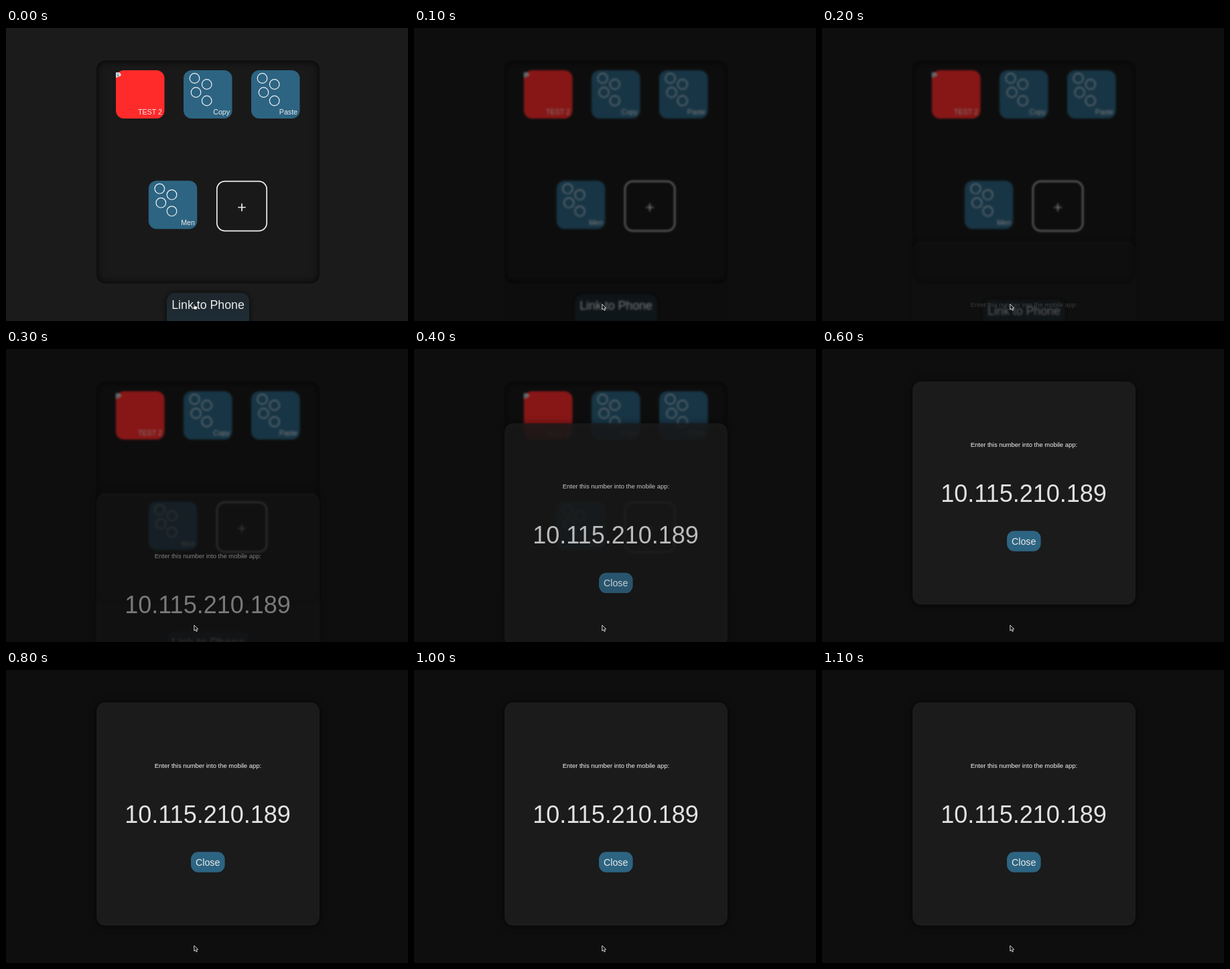
An HTML page with a canvas that plays this animation: 600 px wide and 437 px high, repeating every 1400 ms.

```html
<!DOCTYPE html>
<html lang="en">
<head>
<meta charset="utf-8">
<title>Link to Phone</title>
<style>
html, body { margin: 0; width: 100%; height: 100%; overflow: hidden; background: #1b1b1b; }
canvas { display: block; width: 600px; height: 437px; }
</style>
</head>
<body>
<canvas id="stage" width="600" height="437"></canvas>
<script>
const W = 600, H = 437, LOOP = 1400, STEP = 100;
const FONT = '"Liberation Sans", Arial, sans-serif';
const BG = '#1b1b1b', BLUE = '#2d6482', RED = '#ff2b2b';
const ctx = document.getElementById('stage').getContext('2d');
const back = document.createElement('canvas');
back.width = W;
back.height = H;
const backCtx = back.getContext('2d');

function box(c, x, y, w, h, r) {
  c.beginPath();
  c.roundRect(x, y, w, h, r);
}

function text(c, str, x, y, size, align = 'center', color = '#ececec') {
  c.font = `${size}px ${FONT}`;
  c.textAlign = align;
  c.fillStyle = color;
  c.fillText(str, x, y);
}

function shadow(c, color, blur, y = 0) {
  c.shadowColor = color;
  c.shadowBlur = blur;
  c.shadowOffsetY = y;
}

function polygon(c, points) {
  c.beginPath();
  points.forEach(([x, y]) => c.lineTo(x, y));
  c.closePath();
}

// Solves the CSS ease-in-out curve, cubic-bezier(.42, 0, .58, 1).
function easeInOut(x) {
  if (x <= 0) return 0;
  if (x >= 1) return 1;
  let lo = 0, hi = 1;
  for (let i = 0; i < 30; i++) {
    const u = (lo + hi) / 2, v = 1 - u;
    const bx = 3 * v * v * u * 0.42 + 3 * v * u * u * 0.58 + u ** 3;
    if (bx < x) lo = u; else hi = u;
  }
  return lo * lo * (3 - 2 * lo);
}

function panel(c) {
  c.save();
  box(c, 135, 48.5, 333, 332.5, 14);
  c.fillStyle = '#191919';
  c.fill();
  c.clip();
  // An outside frame casts its shadow inward.
  shadow(c, 'rgba(0,0,0,.85)', 12);
  c.fillStyle = '#111';
  c.beginPath();
  c.rect(95, 8, 413, 413);
  c.roundRect(135, 48.5, 333, 332.5, 14);
  c.fill('evenodd');
  c.restore();
}

function tile(c, x, y, label, color) {
  box(c, x, y, 72.5, 72, 12);
  c.fillStyle = color;
  c.fill();
  text(c, label, x + 69, y + 66, 10.62, 'right');
}

function dots(c, x, y) {
  c.strokeStyle = '#eef2f4';
  c.lineWidth = 1.2;
  for (const [dx, dy] of [[16.5, 12], [34.7, 21], [18.5, 33], [34.7, 45.5]]) {
    c.beginPath();
    c.arc(x + dx, y + dy, 7.3, 0, Math.PI * 2);
    c.stroke();
  }
}

function missingImage(c, x, y) {
  c.fillStyle = '#e8e8e8';
  polygon(c, [[x, y], [x + 5, y], [x + 7.5, y + 2.5], [x + 7.5, y + 5], [x, y + 8]]);
  c.fill();
  c.fillStyle = '#a9c3e6';
  c.fillRect(x + 1, y + 1, 4, 3.5);
  c.fillStyle = '#5d9c57';
  polygon(c, [[x + 1, y + 6], [x + 3, y + 3.5], [x + 5, y + 5.2]]);
  c.fill();
}

function addTile(c) {
  c.strokeStyle = '#f0f0f0';
  c.lineWidth = 1.7;
  box(c, 314.8, 228.7, 74.4, 74, 12);
  c.stroke();
  c.beginPath();
  c.moveTo(346.3, 267.5);
  c.lineTo(357.7, 267.5);
  c.moveTo(352, 261.8);
  c.lineTo(352, 273.2);
  c.stroke();
}

function linkButton(c, dy) {
  c.save();
  c.translate(0, dy);
  const fill = c.createLinearGradient(0, 395, 0, 437);
  fill.addColorStop(0, '#1d262b');
  fill.addColorStop(1, '#1e2d36');
  c.save();
  shadow(c, 'rgba(0,0,0,.7)', 10);
  box(c, 240, 395, 123, 60, 12);
  c.fillStyle = fill;
  c.fill();
  c.restore();
  text(c, 'Link to Phone', 301.5, 418.5, 17.75);
  c.restore();
}

function home(c, buttonDrop) {
  c.fillStyle = BG;
  c.fillRect(0, 0, W, H);
  panel(c);
  tile(c, 164, 63, 'TEST 2', RED);
  missingImage(c, 164, 66.3);
  for (const [x, y, label] of [[265, 63, 'Copy'], [366, 63, 'Paste'], [212.8, 227.7, 'Men']]) {
    tile(c, x, y, label, BLUE);
    dots(c, x, y);
  }
  addTile(c);
  linkButton(c, buttonDrop);
}

function modal(c, p) {
  c.save();
  c.globalAlpha = p;
  c.translate(0, 48.3 + 333 * (1 - p));
  c.save();
  shadow(c, 'rgba(0,0,0,.6)', 11, 1);
  box(c, 135, 0, 333, 333, 13);
  c.fillStyle = BG;
  c.fill();
  c.restore();
  text(c, 'Enter this number into the mobile app:', 301.4, 97.6, 9.44, 'center', '#f4f4f4');
  text(c, '10.115.210.189', 301, 179.2, 36, 'center', '#e2e2e2');
  box(c, 276, 223, 50.6, 30.4, 11);
  c.fillStyle = BLUE;
  c.fill();
  text(c, 'Close', 301.2, 243.2, 14.16);
  c.restore();
}

function arrow(c, x, y) {
  c.save();
  c.translate(x, y);
  polygon(c, [[0, 0], [0, 8.2], [1.9, 6.6], [3.2, 9.4], [4.7, 8.7], [3.5, 6], [5.8, 5.8]]);
  c.fillStyle = '#0a0a0a';
  c.strokeStyle = '#eee';
  c.lineWidth = 0.9;
  c.fill();
  c.stroke();
  c.restore();
}

function hand(c, x, y) {
  c.save();
  c.translate(x, y);
  polygon(c, [[0, 0], [1.6, 0], [2.2, 3], [5.6, 3.8], [6, 5], [5, 8.6], [1.5, 8.6], [-2, 5], [-1.2, 4.2], [0.5, 5]]);
  c.fillStyle = '#f0f0f0';
  c.strokeStyle = '#111';
  c.lineWidth = 0.9;
  c.fill();
  c.stroke();
  c.restore();
}

function draw(t) {
  const open = t >= 100;
  const p = easeInOut((t - 50) / 500);
  if (!open) {
    home(ctx, 0);
    hand(ctx, 279.8, 411.5);
    return;
  }
  home(backCtx, 1 + 48 * p);
  ctx.fillStyle = BG;
  ctx.fillRect(0, 0, W, H);
  ctx.filter = 'blur(1.7px)';
  ctx.drawImage(back, 0, 0);
  ctx.filter = 'none';
  ctx.fillStyle = 'rgba(0,0,0,.47)';
  ctx.fillRect(0, 0, W, H);
  modal(ctx, p);
  arrow(ctx, 280.8, t < 800 ? 411.9 : 411);
}

const start = performance.now();
function tick(now) {
  const t = Math.max(0, now - start) % LOOP;
  draw(Math.floor(t / STEP) * STEP);
  requestAnimationFrame(tick);
}
draw(0);
requestAnimationFrame(tick);
</script>
</body>
</html>
```
